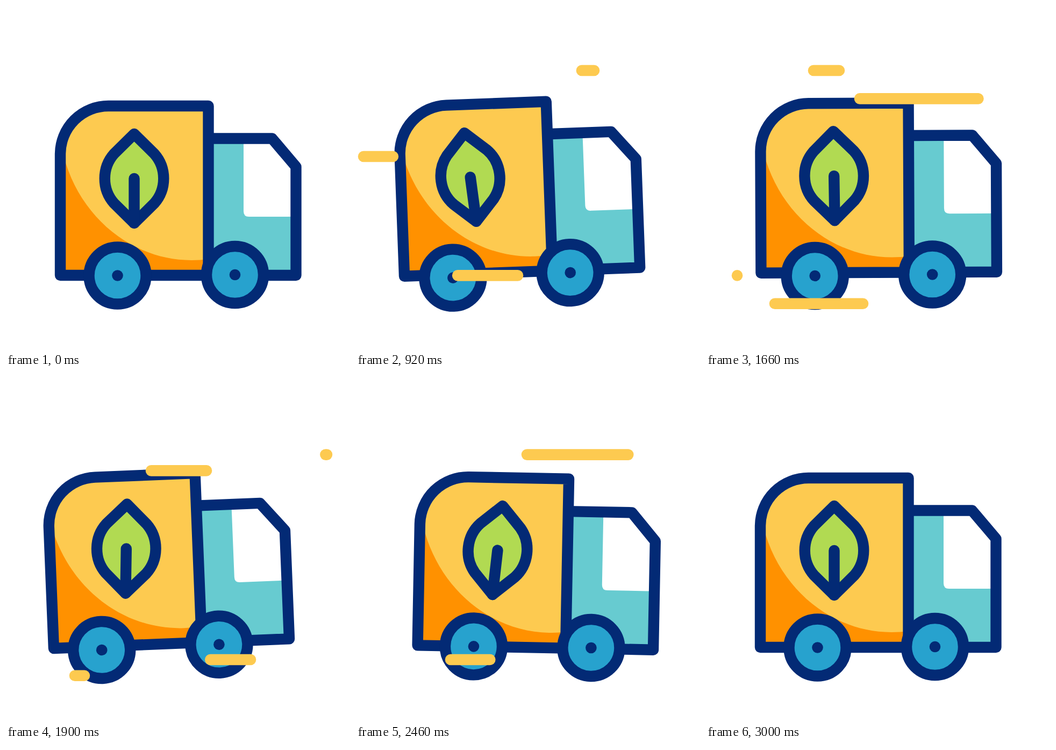
An HTML page that plays this animation: 640x640 px, repeating every 3020 ms.

```html
<!DOCTYPE html>
<html lang="en">
<head>
<meta charset="utf-8">
<title>Eco delivery truck</title>
<style>
  html, body { margin: 0; height: 100%; overflow: hidden; background: #fff; }
  svg { display: block; width: 100vw; height: 100vh; }
  .ink { stroke: #032a75; stroke-width: 20.4; stroke-linecap: round; stroke-linejoin: round; }
  .wheel { fill: #27a2ce; }
  .hub { fill: #032a75; }
  #streaks { stroke: #fdca50; stroke-width: 20.6; stroke-linecap: round; }
</style>
</head>
<body>
<svg viewBox="0 0 640 640">
  <defs>
    <g id="wheel">
      <circle class="ink wheel" r="53"/>
      <circle class="hub" r="10.3"/>
    </g>
  </defs>
  <g id="body">
    <path fill="#67cbd0" d="M376.5 246.5H495L539.5 299V501H376.5Z"/>
    <path fill="#fff" d="M442 246.5H495L539.5 299V392H452Q442 392 442 382Z"/>
    <path class="ink" fill="none" d="M376.5 246.5H495L539.5 299V501H376.5"/>
    <path fill="#fdca50" d="M101 501V275A89.5 89.5 0 0 1 190.5 186H376.5V501Z"/>
    <path fill="#ff9100" d="M101 501V255L111 292C145 400 240 473 345 473Q362 473 376.5 471V501Z"/>
    <path class="ink" fill="none" d="M101 501V275A89.5 89.5 0 0 1 190.5 186H376.5V501Z"/>
    <g id="leaf">
      <path class="ink" fill="#b1da52" d="M238.5 238L276 275C299 301 299 341 276 367L238.5 404L201 367C178 341 178 301 201 275Z"/>
      <path class="ink" d="M238.5 321V404"/>
    </g>
  </g>
  <g id="wheels">
    <use href="#wheel" x="207.5" y="501.5"/>
    <use href="#wheel" x="426" y="500"/>
  </g>
  <g id="streaks"></g>
</svg>
<script>
const LOOP = 3020, START = 280, END = 3000;
const TRAVEL = 530;   // time a streak's end needs to cross its path
const PAIR = { dx: 142, dy: -381.4, delay: 150 };

const $ = id => document.getElementById(id);
const clamp = v => Math.min(1, Math.max(0, v));
const ease = v => v * v * (3 - 2 * v);

// Eases from rest through alternating back and forward poses to rest again.
// A bias above 1 stays longer near the forward pose, below 1 near the back pose.
function swing(turns, back, forward, bias = 1) {
  const times = [START, ...turns, END];
  const pose = i => i === 0 || i === turns.length + 1 ? 0 : i % 2 ? back : forward;
  return t => {
    const now = Math.min(END, Math.max(START, t));
    const i = times.findIndex(time => time >= now && time > START) - 1;
    const u = (now - times[i]) / (times[i + 1] - times[i]);
    const from = pose(i), to = pose(i + 1);
    const share = to < from ? ease(u) ** bias : 1 - ease(1 - u) ** bias;
    return from + (to - from) * share;
  };
}

const rocking = [855, 1400, 1910, 2395];
const bodyX = swing(rocking, -18.6, 16.8, 1.2);
const tilt = swing(rocking, -2.3, 1.1, 1.4);
const wheelX = swing(rocking, -29.5, 11.5, 1.4);
const bodyY = swing([800, 1350, 1850, 2400], -6.8, 0.6, 0.6);
const sway = swing([1120, 2280], -6.5, 6.5);

function streak(y, right, length, start, lag) {
  const line = document.createElementNS($('streaks').namespaceURI, 'line');
  const set = (name, value) => line.setAttribute(name, value);
  set('y1', y);
  set('y2', y);
  $('streaks').append(line);
  return t => {
    const head = clamp((t - start) / TRAVEL);
    const tail = clamp((t - start - lag) / TRAVEL);
    set('x1', right - length * ease(head));
    set('x2', right - length * ease(tail));
    set('visibility', head > 0 && tail < 1 ? 'visible' : 'hidden');
  };
}

// A streak near the road, followed by one above the truck.
const pair = (y, right, length, start, lag) => [
  streak(y, right, length, start, lag),
  streak(y + PAIR.dy, right + PAIR.dx, length, start + PAIR.delay, lag)
];

const streaks = [
  streak(280, 257, 243, 290, 264),
  ...pair(501.4, 301, 243, 670, 462),
  ...pair(553.8, 371, 243, 1064, 395),
  ...pair(524, 455, 279, 1721, 388)
];

function draw(t) {
  const angle = tilt(t);
  $('body').setAttribute('transform', `translate(${bodyX(t)} ${bodyY(t)}) rotate(${angle} 320 345)`);
  $('wheels').setAttribute('transform', `translate(${wheelX(t)} 0) rotate(${angle} 320 501)`);
  $('leaf').setAttribute('transform', `rotate(${sway(t)} 238.5 404.5)`);
  streaks.forEach(update => update(t));
}

const origin = performance.now();
function tick() {
  draw((performance.now() - origin) % LOOP);
  requestAnimationFrame(tick);
}
tick();
</script>
</body>
</html>
```
